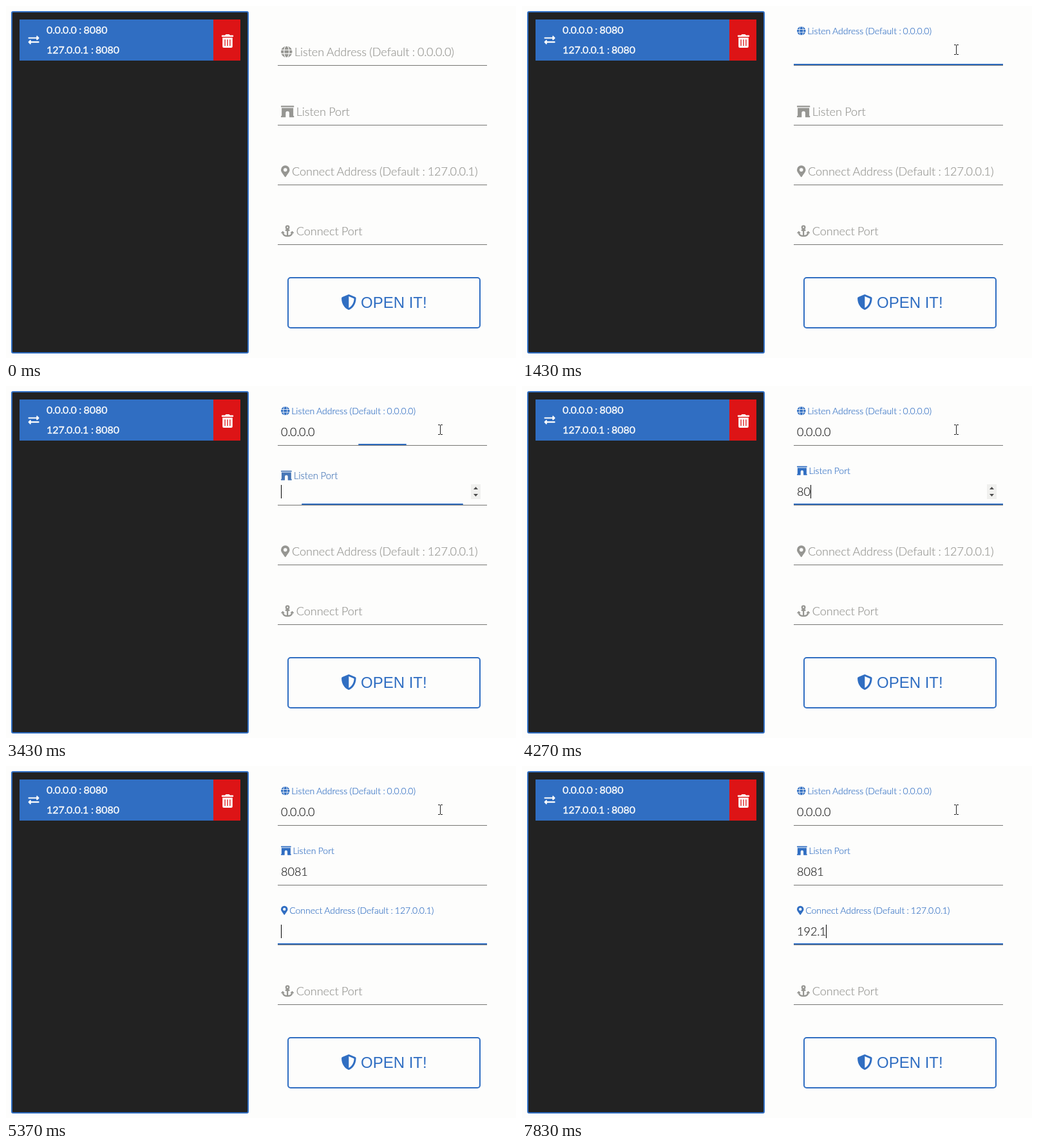
An HTML page that plays this animation: 792 by 548 pixels, repeating every 8 s.

```html
<!DOCTYPE html>
<html lang="en">
<head>
<meta charset="utf-8">
<title>Port forwarding form</title>
<style>
  html, body { margin: 0; width: 100%; height: 100%; overflow: hidden; background: #fdfdfc; }
  svg { display: block; width: 792px; height: 548px; }
  text { white-space: pre; }
  .lato { font: 300 18px Lato, sans-serif; fill: currentColor; stroke: currentColor; stroke-width: .2px; word-spacing: -.03em; }
  .row { font: 400 16px Lato, sans-serif; fill: #fdfdfc; stroke: #fdfdfc; stroke-width: .35px; word-spacing: -.03em; }
  .mark { letter-spacing: -.036em; }
  .button { font: 24px "Liberation Sans", Arial, sans-serif; fill: #306ec2; }
  rect { shape-rendering: crispEdges; }
  .round { shape-rendering: auto; }
</style>
</head>
<body>
<svg id="stage" viewBox="0 0 792 548" xmlns="http://www.w3.org/2000/svg">
  <defs>
    <g id="globe">
      <circle cx="248" cy="256" r="248"/>
      <g fill="none" stroke="#fdfdfc" stroke-width="32">
        <path d="M0 176H496M0 336H496"/>
        <ellipse cx="248" cy="256" rx="112" ry="262"/>
      </g>
    </g>
    <path id="arch" d="M560 448h-16V96H32v352H16q-16 0-16 16v32q0 16 16 16h176q16 0 16-16V320a80 80 0 0 1 160 0v176q0 16 16 16h176q16 0 16-16v-32q0-16-16-16zM560 0H16Q0 0 0 16v32q0 16 16 16h544q16 0 16-16V16q0-16-16-16z"/>
    <path id="marker" d="M172 502C27 291 0 269 0 192a192 192 0 0 1 384 0c0 77-27 99-172 310-10 13-30 13-40 0zM192 272a80 80 0 1 0 0-160 80 80 0 0 0 0 160z"/>
    <g id="anchor">
      <path d="M192 204q0-12 12-12h168q12 0 12 12v40q0 12-12 12H204q-12 0-12-12zM13 352q-18-5-9-20l67-67q9-9 18 0l67 67q9 15-9 20zM563 352q18-5 9-20l-67-67q-9-9-18 0l-67 67q-9 15 9 20z"/>
      <g fill="none" stroke="currentColor" stroke-width="64">
        <circle cx="288" cy="96" r="64"/>
        <path d="M288 170V479M78 345C102 437 200 479 288 479S474 437 498 345"/>
      </g>
    </g>
    <path id="shield" d="M466 84L274 4a48 48 0 0 0-36 0L46 84A48 48 0 0 0 16 128c0 198 114 336 222 380a48 48 0 0 0 36 0C360 473 496 349 496 128a48 48 0 0 0-30-44zM256 446V65l176 74c-3 151-82 261-176 307z"/>
    <path id="trash" d="M32 464a48 48 0 0 0 48 48h288a48 48 0 0 0 48-48V128H32zm272-256a16 16 0 0 1 32 0v224a16 16 0 0 1-32 0zm-96 0a16 16 0 0 1 32 0v224a16 16 0 0 1-32 0zm-96 0a16 16 0 0 1 32 0v224a16 16 0 0 1-32 0zM432 32H312l-9-19a24 24 0 0 0-22-13H167a24 24 0 0 0-22 13l-9 19H16A16 16 0 0 0 0 48v32a16 16 0 0 0 16 16h416a16 16 0 0 0 16-16V48a16 16 0 0 0-16-16z"/>
    <path id="swap" d="M0 168v-16q0-24 24-24h360V80c0-21 26-32 41-17l80 80q14 17 0 34l-80 80c-15 15-41 5-41-17v-48H24q-24 0-24-24zM488 320H128v-48c0-21-26-32-41-17l-80 80q-14 17 0 34l80 80c15 15 41 4 41-17v-48h360q24 0 24-24v-16q0-24-24-24z"/>
  </defs>

  <rect width="792" height="548" fill="#fdfdfc"/>
  <rect class="round" x="9" y="9" width="367" height="531" rx="2" fill="#222" stroke="#306ec2" stroke-width="2"/>
  <rect x="21" y="21" width="301" height="64" fill="#306ec2"/>
  <rect x="322" y="21" width="42" height="64" fill="#dd1416"/>
  <use href="#swap" fill="#fdfdfc" transform="translate(34.5 44.5) scale(.0332)"/>
  <use href="#trash" fill="#fdfdfc" transform="translate(334.9 44.1) scale(.0406)"/>
  <g id="rows"></g>
  <g id="form"></g>

  <rect class="round" x="438" y="423" width="298" height="78" rx="4" fill="none" stroke="#306ec2" stroke-width="2"/>
  <use href="#shield" fill="#306ec2" transform="translate(520.3 449) scale(.0469)"/>
  <text class="button" x="551" y="470">OPEN IT!</text>

  <g id="pointer">
    <path id="arrow" d="M.5 .5V16.5L4.3 13 6.8 18.6 9.2 17.6 6.8 12.2H12z" fill="#fff" stroke="#000"/>
    <path id="beam" d="M-3 -7.5H0M1 -7.5H4M.5 -7V7M-3 7.5H0M1 7.5H4" fill="none" stroke="#222"/>
  </g>
</svg>
<script>
const LOOP = 8000, FADE = 200, LEAD = 33, BLINK = 500;
const LEFT = 422, WIDTH = 325, TEXT_X = 427, PITCH = 93;
const GREY = [150, 150, 146], BLUE = [48, 110, 194];

const fields = [
  { label: "Listen Address (Default : 0.0.0.0)", icon: "globe", em: 496 / 512, focus: 930, blur: 3370,
    keys: [[1970, "0"], [2130, "0."], [2270, "0.0"], [2370, "0.0."], [2500, "0.0.0"], [2670, "0.0.0."], [2800, "0.0.0.0"]] },
  { label: "Listen Port", icon: "arch", em: 576 / 512, focus: 3370, blur: 5170, spinner: true,
    keys: [[4170, "8"], [4270, "80"], [4630, "808"], [4870, "8081"]] },
  { label: "Connect Address (Default : 127.0.0.1)", icon: "marker", em: 384 / 512, focus: 5170, blur: Infinity,
    keys: [[5870, "1"], [6030, "19"], [6200, "192"], [6530, "192."], [6830, "192.1"]] },
  { label: "Connect Port", icon: "anchor", em: 576 / 512, focus: Infinity, blur: Infinity, keys: [] }
];

const $ = id => document.getElementById(id);

function add(parent, tag, attrs) {
  const el = document.createElementNS("http://www.w3.org/2000/svg", tag);
  set(el, attrs);
  return parent.appendChild(el);
}

function set(el, attrs) {
  for (const name in attrs) el.setAttribute(name, attrs[name]);
}

// Dots and colons are set slightly tighter than the rest
function write(el, text) {
  if (el.textContent === text) return;
  el.textContent = "";
  for (const part of text.split(/([.:])/)) {
    if (part) add(el, "tspan", /[.:]/.test(part) ? { class: "mark" } : {}).textContent = part;
  }
}

const show = (el, on) => set(el, { visibility: on ? "visible" : "hidden" });
const mix = (a, b, p) => a + (b - a) * p;
const clamp = x => Math.min(1, Math.max(0, x));

// CSS "ease": cubic-bezier(.25, .1, .25, 1)
function ease(x) {
  if (x <= 0) return 0;
  if (x >= 1) return 1;
  const bezier = (a, b, u) => 3 * a * u * (1 - u) ** 2 + 3 * b * u * u * (1 - u) + u ** 3;
  let lo = 0, hi = 1;
  for (let i = 0; i < 24; i++) {
    const mid = (lo + hi) / 2;
    if (bezier(.25, .25, mid) < x) lo = mid; else hi = mid;
  }
  return bezier(.1, 1, lo);
}

function build(f, i) {
  const g = add($("form"), "g", { transform: `translate(0 ${i * PITCH})` });
  add(g, "rect", { x: LEFT, y: 92, width: WIDTH, height: 1, fill: "#757572" });
  f.bar = add(g, "rect", { y: 90, height: 2, fill: "#306ec2", class: "round" });
  f.title = add(g, "g", {});
  add(f.title, "use", { href: "#" + f.icon, transform: `translate(0 -15.75) scale(${18 / 512})` });
  write(add(f.title, "text", { class: "lato", x: (f.em + .193) * 18 }), f.label);
  f.value = add(g, "text", { class: "lato", x: TEXT_X, y: 78, color: "#222" });
  if (f.spinner) {
    f.buttons = add(g, "g", {});
    add(f.buttons, "rect", { x: 722, y: 60, width: 15, height: 23, fill: "#f0f0ee" });
    add(f.buttons, "path", { d: "M726 68l3.5-4 3.5 4zM726 75l3.5 4 3.5-4z", fill: "#4c4c4c" });
  }
  f.caret = add(g, "rect", { y: 61, width: 1, height: 21, fill: "#000" });
}

function drawField(f, t) {
  const rise = ease((t - f.focus + LEAD) / FADE);
  const open = rise - ease((t - f.blur + LEAD) / FADE);
  const color = `rgb(${GREY.map((c, k) => Math.round(mix(c, BLUE[k], rise)))})`;
  const size = mix(18, 14, rise);
  set(f.title, {
    transform: `translate(${TEXT_X} ${mix(78, 44, rise)}) scale(${size / 18})`,
    fill: color, color
  });
  set(f.bar, { x: LEFT + WIDTH * (1 - open) / 2, width: WIDTH * open });

  const typed = f.keys.filter(k => k[0] <= t).pop();
  const text = typed ? typed[1] : "";
  write(f.value, text);

  const focused = t >= f.focus && t < f.blur;
  const since = t - (typed ? typed[0] : f.focus);
  show(f.caret, focused && Math.floor(since / BLINK) % 2 === 0);
  if (focused) {
    const w = text ? f.value.getComputedTextLength() : 0;
    set(f.caret, { x: Math.round(TEXT_X + w) });
  }
  if (f.buttons) show(f.buttons, focused);
}

function drawPointer(t) {
  const p = 1 - (1 - clamp((t - 570) / 300)) ** 2;
  const x = Math.round(mix(767, 674, p)), y = Math.round(mix(89, 68, p));
  const overInput = x < LEFT + WIDTH;
  set($("pointer"), { transform: `translate(${x} ${y})` });
  show($("arrow"), t >= 570 && !overInput);
  show($("beam"), t >= 570 && overInput);
}

function draw(t) {
  fields.forEach(f => drawField(f, t));
  drawPointer(t);
}

write(add($("rows"), "text", { class: "row", x: 63, y: 43 }), "0.0.0.0 : 8080");
write(add($("rows"), "text", { class: "row", x: 63, y: 74 }), "127.0.0.1 : 8080");
fields.forEach(build);
const start = performance.now();
function tick() {
  draw((performance.now() - start) % LOOP);
  requestAnimationFrame(tick);
}
tick();
</script>
</body>
</html>
```
